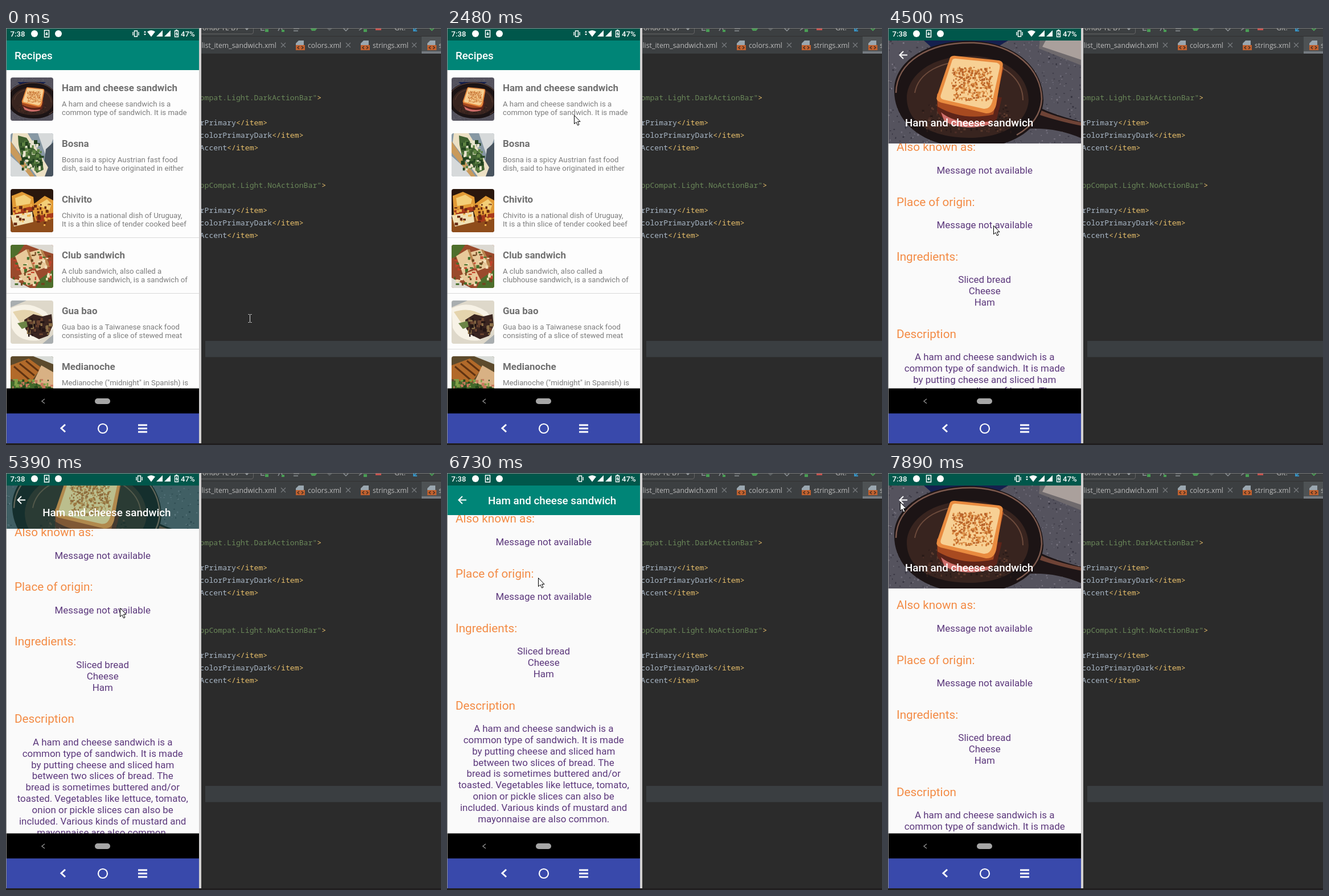
An HTML page with a canvas that plays this animation: 764 by 733 pixels, repeating every 8 s.

```html
<!DOCTYPE html>
<html lang="en">
<head>
<meta charset="utf-8">
<title>Recipes</title>
<style>
html, body { margin: 0; width: 100%; height: 100%; overflow: hidden; background: #2b2b2b; }
canvas { display: block; }
</style>
</head>
<body>
<canvas id="stage" width="764" height="733"></canvas>
<script>
const c = document.getElementById('stage').getContext('2d');
const LOOP = 8000, BAR_TOP = 22, INNER_MAX = 23, COLLAPSE_MAX = 129, WIDTH = 338, NAV_TOP = 633.5;
const TEAL = '#008577', WHITE = '#fff', ORANGE = '#f38b45', PURPLE = '#5c387c';
const roboto = (size, weight = 400) => `${weight} ${size}px Roboto, sans-serif`;
const MONO = '13.2px "Noto Sans Mono", monospace';
const TAB = '12.3px "Open Sans", sans-serif';

// Tracks: rows of [time, ...values]
const CURSOR = [[430, 428, 510], [1620, 222.5, 152.5], [3190, 222.5, 152.5], [3785, 176, 375],
  [3930, 176, 375], [4500, 185, 347], [5700, 203, 212], [6095, 211, 184], [6250, 211, 184],
  [6680, 160, 184], [7000, 122, 281], [7200, 122, 281], [7835, 21, 51]];
const SCROLL = [[3930, 0], [4500, 23], [5700, 152], [6720, 152], [7040, 0]];
const SCRIM = [[5190, 0], [5750, 1], [6900, 1], [7110, .65], [7450, 0]];
const OPEN = [[2560, 0], [2900, 1]];
const RIPPLE = [[2460, 0], [2615, 1], [2900, 0]];
const GLOW_END = [[5700, 0], [6095, 1], [6250, 1], [6500, 0]];
const GLOW_START = [[6960, 0], [7110, 1], [7300, 0]];

function track(rows, t) {
  const i = rows.findIndex(row => row[0] > t);
  if (i === 0) return rows[0].slice(1);
  if (i < 0) return rows[rows.length - 1].slice(1);
  const a = rows[i - 1], b = rows[i], p = (t - a[0]) / (b[0] - a[0]), e = p * p * (3 - 2 * p);
  return a.slice(1).map((v, k) => v + (b[k + 1] - v) * e);
}
const value = (rows, t) => track(rows, t)[0];

function grabTime(t) {
  if (t < 570) return 0;
  return t < 2470 ? 570 + Math.floor((t - 570) / 150) * 150 : 2470 + Math.floor((t - 2470) / 145) * 145;
}

function rect(color, x, y, w, h, r = 0) {
  c.fillStyle = color;
  c.beginPath();
  c.roundRect(x, y, w, h, r);
  c.fill();
}
function text(str, x, y, font, color, align = 'left') {
  c.font = font;
  c.fillStyle = color;
  c.textAlign = align;
  c.fillText(str, x, y);
}
function fill(color, d) {
  c.fillStyle = color;
  c.fill(new Path2D(d));
}
function line(color, width, d) {
  c.strokeStyle = color;
  c.lineWidth = width;
  c.stroke(new Path2D(d));
}
function disc(color, x, y, r) {
  c.fillStyle = color;
  c.beginPath();
  c.arc(x, y, r, 0, 7);
  c.fill();
}
function clipped(x, y, w, h, r, draw) {
  c.save();
  c.beginPath();
  c.roundRect(x, y, w, h, r);
  c.clip();
  draw();
  c.restore();
}
function random(seed) {
  return () => (seed = (seed * 16807) % 2147483647) / 2147483647;
}
function specks(colors, count, size, x, y, w, h) {
  const rnd = random(count * 71 + 5);
  for (let i = 0; i < count; i++) {
    c.fillStyle = colors[i % colors.length];
    c.fillRect(x + rnd() * w, y + rnd() * h, size * (.5 + rnd()), size * (.5 + rnd()));
  }
}

// ---- Food pictures ----
function panPhoto() {
  rect('#55535e', -60, -60, 460, 320);
  specks(['#6b6976', '#403e49', '#7a7682', '#35333f'], 1600, 2, -60, -60, 460, 320);
  fill('#15204e', 'M62 0H210L190 12Q140 -2 80 16Z');
  fill('#6f6a6d', 'M266 0H339V44L264 14Z');
  fill('#aaa09c', 'M276 0H339V34L270 11Z');
  // Handle, then bowl
  fill('#1d1517', 'M255 112Q280 128 339 143V172Q290 150 232 156Z');
  fill('#6e4336', 'M262 120Q290 134 339 144V150Q290 140 258 128Z');
  fill('#1c1415', 'M10 85C12 35 70 -2 150 1C225 4 272 50 272 105C270 155 215 192 140 188C55 186 8 140 10 85Z');
  line('#7d5a4e', 2.5, 'M13 92C14 38 70 2 150 4C222 7 268 50 269 103C267 132 250 152 225 166');
  fill('#38241f', 'M32 100C34 58 80 25 148 27C210 30 246 65 246 105C244 145 200 172 140 171C75 170 32 145 32 100Z');
  specks(['#5b3a2d', '#4a2c26', '#281a18'], 150, 3, 56, 112, 160, 48);
  line('#6d4b3c', 2, 'M46 92C52 58 90 34 150 36C206 39 236 70 236 105');
  fill('#5d2419', 'M86 92L85 122Q90 142 130 150Q168 156 190 138L199 100Z');
  fill('#cf6f6b', 'M92 126Q120 150 180 142L176 148Q130 160 98 142Z');
  fill('#a84a20', 'M85 94L86 116Q130 142 184 130L202 46Z');
  fill('#e98b3f', 'M108 30Q111 26 118 27L194 35Q203 37 200 47L189 113Q185 129 171 128L92 109Q82 106 85 98Z');
  fill('#f7d094', 'M112 34Q114 31 120 32L190 39Q197 41 195 49L182 108Q178 121 167 120L97 104Q89 102 92 95Z');
  specks(['#c9702b', '#dd9148', '#b8632a'], 330, 2.8, 110, 46, 70, 58);
}
const PHOTOS = [
  () => {
    c.translate(-9, 8);
    c.scale(.34, .34);
    panPhoto();
  },
  () => {
    rect('#8798a4', 0, 0, 75, 76);
    fill('#d6d9da', 'M0 40L40 76H0ZM48 0H75V10L62 40Z');
    fill('#48545f', 'M62 28L75 16V76H56Z');
    fill('#ece0c4', 'M4 0H30L66 60L60 76H46L2 16Z');
    fill('#c99a5b', 'M0 14L42 76H34L0 34Z');
    fill('#3f6130', 'M13 4L28 8L40 26L54 38L58 64L46 70L32 48L18 38L14 20Z');
    specks(['#23421f', '#5e8443', '#e8e4cd'], 75, 5, 16, 12, 36, 50);
  },
  () => {
    rect('#2a170d', 0, 0, 75, 76);
    fill('#8f4d1b', 'M0 52L75 46V76H0Z');
    fill('#e19a35', 'M2 12L20 5L40 14L42 32L4 46ZM36 30L60 12L75 20V52L44 56Z');
    fill('#f3cf78', 'M8 16L24 10L36 18L34 26L10 30ZM48 28L64 18L72 26L68 38Z');
    fill('#a83a1c', 'M4 38L40 30V38L8 48ZM44 48L75 42V50L48 60Z');
    fill('#f0e0b4', 'M0 46L38 40L40 58L6 66Z');
    specks(['#6a2a12', '#f0b14a'], 45, 4, 4, 26, 64, 36);
  },
  () => {
    rect('#9a4a2c', 0, 0, 75, 76);
    fill('#4e6f2c', 'M0 0H24L10 20L0 24ZM52 60L75 44V76H44Z');
    fill('#dcd9d2', 'M28 0H75V16L50 8ZM0 58L34 76H0Z');
    fill('#e8c99a', 'M8 20L28 8L40 40L20 52ZM30 14L52 8L66 38L46 46ZM14 54L42 44L52 64L30 72Z');
    fill('#b8844e', 'M28 8L32 8L44 42L40 42ZM52 8L56 9L70 38L65 40Z');
    specks(['#c4432b', '#f2dfb9', '#70461f', '#46702c'], 70, 4, 4, 12, 66, 56);
  },
  () => {
    rect('#ded8ca', 0, 0, 75, 76);
    fill('#a9aeb0', 'M0 0H28L0 12ZM56 76L75 60V76Z');
    fill('#f7f2e6', 'M0 14Q30 -2 62 20Q75 34 75 50L50 70Q14 74 2 48Z');
    fill('#e5d4ad', 'M4 20Q34 10 58 28L20 44Z');
    fill('#3a2520', 'M24 34L40 24L56 28L72 24L74 44L66 62L50 68L34 60L26 50Z');
    specks(['#6a4430', '#241615', '#8d7149'], 50, 5, 28, 30, 40, 30);
    fill('#6b8446', 'M12 40L28 36L30 46L20 50Z');
  },
  () => {
    rect('#5c4a2c', 0, 0, 75, 76);
    fill('#d9dcd8', 'M40 0H75V14Z');
    fill('#b26a2a', 'M0 16L32 4L54 20L34 48L0 40Z');
    line('#5f3312', 3, 'M6 18L34 42M16 13L42 34M27 8L49 26');
    fill('#d8b184', 'M54 16L75 28V56L38 50Z');
    fill('#42692b', 'M0 44L36 46L75 56V76H0Z');
    specks(['#7ea047', '#264a1c', '#c97a5e'], 60, 4, 2, 40, 68, 20);
  }
];

// ---- Editor behind the phone ----
const CODE = [[127, 'ompat.Light.DarkActionBar"', '>'], [171, 'rPrimary', '</item>'],
  [193, 'colorPrimaryDark', '</item>'], [215, 'Accent', '</item>'],
  [281, 'ppCompat.Light.NoActionBar"', '>'], [325, 'rPrimary', '</item>'],
  [347, 'colorPrimaryDark', '</item>'], [369, 'Accent', '</item>']];

function fileIcon(x) {
  fill('#9aa7b0', `M${x + 5} 22H${x + 14}V30H${x}V27Z`);
  rect('#c0612f', x, 30, 16, 9);
  line('#3c2a20', 1.2, `M${x + 6} 32L${x + 3} 34.5L${x + 6} 37M${x + 10} 32L${x + 13} 34.5L${x + 10} 37`);
}
function editor() {
  rect('#2b2b2b', 339, 0, 425, 733);
  rect('#3c3f41', 339, 0, 425, 45);
  rect('#4e5254', 730, 15, 34, 30);
  rect('#747a80', 730, 41, 34, 4);
  rect('#323232', 339, 14, 425, 1);
  line('#646464', 1, 'M340 10.5H431Q434.5 10.5 434.5 7V0');
  text('ondo TE B7', 345, 4, TAB, '#bbb');
  text('Git:', 682, 4, TAB, '#bbb');
  fill('#9aa0a4', 'M419 0H427L423 4Z');
  line('#8d9397', 1.5, 'M448 0V4H454M478 5L482 -3L486 5M505 1H515M505 5H513M592 0L597 5L601 1M620 4L626 0');
  fill('#499c54', 'M455 2H461V7H455ZM484 3H489V7H484ZM534 0H547L543 5H537ZM628 2H634V7H628Z');
  fill('#5c6164', 'M563 0H574L568 5Z');
  rect('#c75450', 649, -4, 10, 8);
  line('#3592c4', 2, 'M724 -2L717 4M716 -1V5H722');
  line('#499c54', 2, 'M744 0L748 4L754 -2');
  rect('#777', 339, 0, 425, 1);
  text('list_item_sandwich.xml', 343.5, 35, TAB, '#bbb');
  text('colors.xml', 530, 35, TAB, '#bbb');
  text('strings.xml', 644, 35, TAB, '#bbb');
  text('s', 760, 35, TAB, '#bbb');
  [509, 623, 740].forEach(fileIcon);
  for (const x of [487, 601, 717]) line('#777b7e', 1.2, `M${x - 4} 26L${x + 4} 34M${x + 4} 26L${x - 4} 34`);
  for (const [y, body, tag] of CODE) {
    text(body, 340.6, y, MONO, body.endsWith('"') ? '#6a8759' : '#a9b7c6');
    text(tag, 340.6 + c.measureText(body).width, y, MONO, '#e8bf6a');
  }
  rect('#3a3e41', 350, 550, 414, 28.5);
  rect('#211f20', 0, 730, 764, 3);
}

// ---- Phone ----
function statusBar(t) {
  const arrows = t < 3640 || t > 7300, early = t < 4780;
  const vibrate = arrows ? 228 : early ? 231 : 234, wifi = arrows || !early ? 255 : 252;
  rect('#00574b', 1, 0, WIDTH, 22);
  text('7:38', 7.5, 14.5, roboto(13.2, 500), WHITE);
  text('47%', 307, 14.5, roboto(13.2, 500), WHITE);
  disc(WHITE, 50, 10, 6);
  line(WHITE, 1.5, 'M67.5 4H75.5V16H67.5ZM71.5 7V12M69.5 10L71.5 12L73.5 10');
  disc(WHITE, 92, 10, 6);
  line(WHITE, 1.4, `M${vibrate - 2.5} 5H${vibrate + 2.5}V15H${vibrate - 2.5}ZM${vibrate - 5} 7V13M${vibrate + 5} 7V13`);
  if (arrows) fill(WHITE, 'M242 8L244 5L246 8ZM242 10H246L244 13Z');
  fill(WHITE, `M${wifi} 15.5L${wifi - 7} 6.5Q${wifi} 1.5 ${wifi + 7} 6.5Z`);
  fill(WHITE, 'M275 4V15H264ZM289 4V15H278Z');
  line(WHITE, 1.3, 'M296.5 5H302.5V15.5H296.5ZM298 3.5H301M300 7L298.5 10.5H301L299.5 13.5');
}

const ROWS = [
  ['Ham and cheese sandwich', 'A ham and cheese sandwich is a', 'common type of sandwich. It is made'],
  ['Bosna', 'Bosna is a spicy Austrian fast food', 'dish, said to have originated in either'],
  ['Chivito', 'Chivito is a national dish of Uruguay,', 'It is a thin slice of tender cooked beef'],
  ['Club sandwich', 'A club sandwich, also called a', 'clubhouse sandwich, is a sandwich of'],
  ['Gua bao', 'Gua bao is a Taiwanese snack food', 'consisting of a slice of stewed meat'],
  ['Medianoche', 'Medianoche ("midnight" in Spanish) is', 'a type of sandwich which originated']];

function list(t) {
  rect('#fdfdfd', 1, 74, WIDTH, 560);
  ROWS.forEach(([name, first, second], i) => {
    const y = 98 * i;
    clipped(8, 87 + y, 75, 76, 4, () => {
      c.translate(8, 87 + y);
      PHOTOS[i]();
    });
    text(name, 98, 111 + y, roboto(16.95, 700), '#707070');
    text(first, 98, 137.5 + y, roboto(13.2), '#7d7d7d');
    text(second, 98, 153 + y, roboto(13.2), '#7d7d7d');
    if (i > 1 && i < 5) rect('#dadada', 1, 172 + y, WIDTH, 1);
  });
  rect(`rgba(0,0,0,${.1 * value(RIPPLE, t)})`, 1, 74, WIDTH, 98);
  rect(TEAL, 1, BAR_TOP, WIDTH, 52);
  text('Recipes', 15, 54.5, roboto(18.8, 500), WHITE);
}

const HEADINGS = [['Also known as:', 239], ['Place of origin:', 335.5], ['Ingredients:', 431.5], ['Description', 567.5]];
const BODY = [[279, 'Message not available'], [375, 'Message not available'],
  [471, 'Sliced bread', 'Cheese', 'Ham'],
  [607, 'A ham and cheese sandwich is a', 'common type of sandwich. It is made',
    'by putting cheese and sliced ham', 'between two slices of bread. The',
    'bread is sometimes buttered and/or', 'toasted. Vegetables like lettuce, tomato,',
    'onion or pickle slices can also be', 'included. Various kinds of mustard and',
    'mayonnaise are also common.']];

function glow(edge, height, alpha) {
  const side = edge + height * .25;
  fill(`rgba(0,133,119,${alpha})`, `M1 ${edge}V${side}Q170 ${edge + height * 1.75} 339 ${side}V${edge}Z`);
}

function detail(t) {
  const scroll = value(SCROLL, t), inner = Math.min(scroll, INNER_MAX), collapse = scroll - inner;
  const part = collapse / COLLAPSE_MAX, bottom = 203 - collapse, scrim = value(SCRIM, t);
  rect('#fafafa', 1, BAR_TOP, WIDTH, 612);
  const end = value(GLOW_END, t), start = value(GLOW_START, t);
  if (end) glow(NAV_TOP, -43 * end, .16 * end);
  if (start) glow(bottom, 18 * start, .06 * start);
  for (const [heading, y] of HEADINGS) text(heading, 15, y - scroll, roboto(20.72), ORANGE);
  for (const [y, ...lines] of BODY)
    lines.forEach((str, i) => text(str, 169.7, y - scroll + i * 19.85, roboto(16.95), PURPLE, 'center'));
  clipped(1, BAR_TOP, WIDTH, bottom - BAR_TOP, 0, () => {
    c.save();
    c.translate(1, BAR_TOP - collapse / 2);
    panPhoto();
    c.restore();
    c.globalAlpha = scrim;
    rect(TEAL, 1, BAR_TOP, WIDTH, 181);
  });
  line(WHITE, 2, 'M34 47.5H21M27 41L20.5 47.5L27 54');
  text('Ham and cheese sandwich', 30 + 42 * part, 172.5 - 118 * part, roboto(18.8, 500), WHITE);
}

function navigation() {
  rect('#000', 1, NAV_TOP, WIDTH, 45);
  line('#8a8a8a', 1.5, 'M68 652L63 656L68 660');
  rect('#a6a6a6', 156, 651, 27, 10, 5);
  rect('#3949ab', 1, 677.5, WIDTH, 52.5);
  line(WHITE, 3, 'M104 697L97 703.5L104 710M232 698H248M232 704H248M232 710H248');
  line(WHITE, 2.2, 'M162 704A8 8 0 1 1 178 704A8 8 0 1 1 162 704');
  rect('#8c8c8c', 0, 0, 1, 730);
  rect('#d2d0d0', 339, 0, 4, 730);
  rect('#8c8c8c', 0, 0, 340, 1);
}

function pointer(t) {
  const [x, y] = track(CURSOR, t).map(Math.round);
  c.save();
  c.translate(x + .5, y + .5);
  if (x > 343) {
    line('#ddd', 1, 'M-3 -7H-1L0 -6L1 -7H3M0 -6V6M-3 7H-1L0 6L1 7H3');
  } else {
    const arrow = 'M0 0V15L3.5 12L6 17.5L8.5 16.5L6 11H10.5Z';
    fill(WHITE, arrow);
    line('#000', 1, arrow);
  }
  c.restore();
}

function draw(t) {
  editor();
  clipped(1, 0, WIDTH, 634, 0, () => {
    const open = value(OPEN, t);
    if (open < 1) list(t);
    if (open > 0) {
      c.save();
      c.globalAlpha = open;
      c.translate(0, 50 * (1 - open));
      detail(t);
      c.restore();
    }
    statusBar(t);
  });
  navigation();
  pointer(t);
}

let begin;
function frame(now) {
  begin ??= now;
  draw(grabTime((now - begin) % LOOP));
  requestAnimationFrame(frame);
}
requestAnimationFrame(frame);
</script>
</body>
</html>
```
